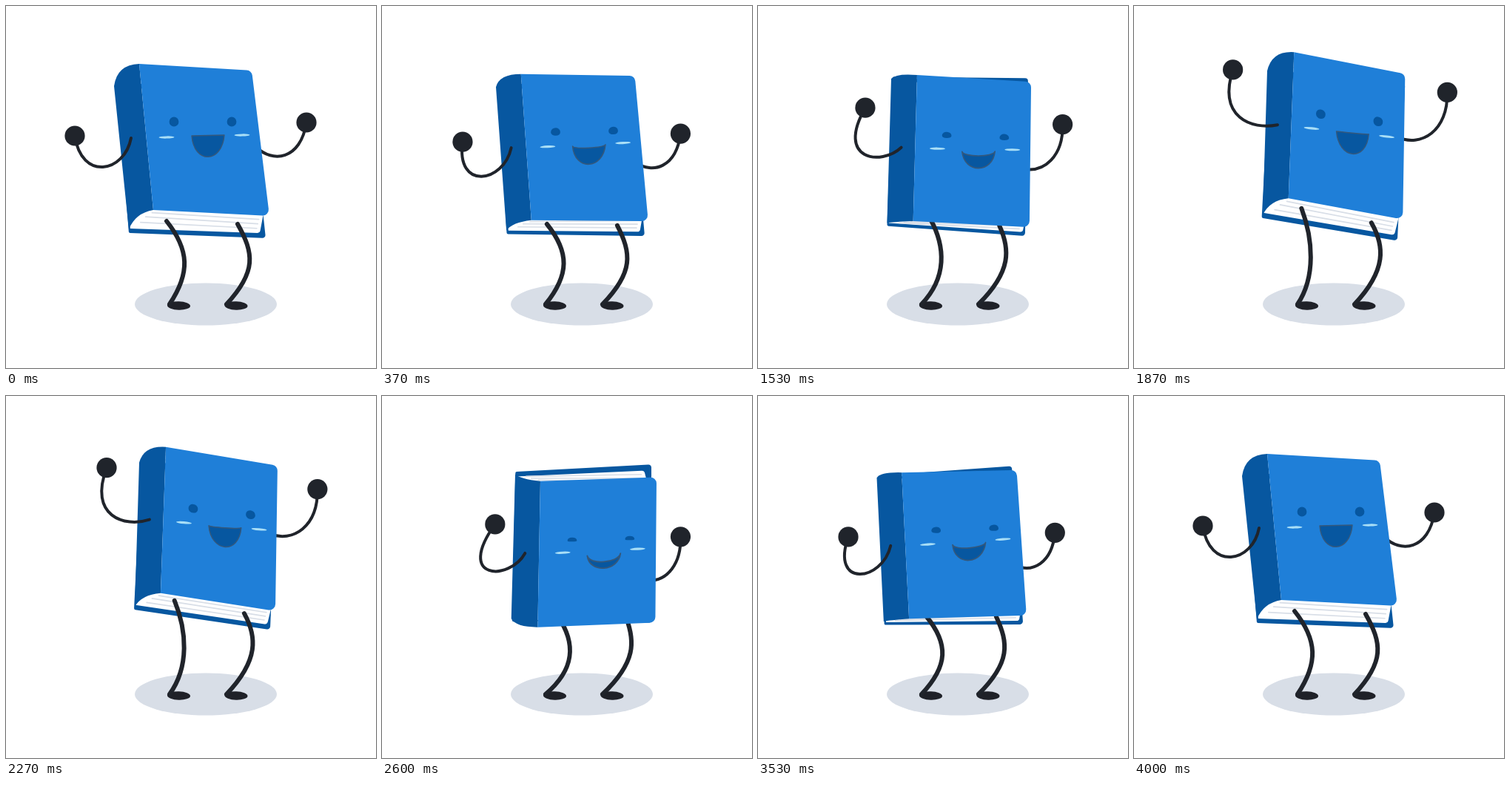
An HTML page with a canvas that plays this animation: 500x488 px, repeating every 4.03 s.

```html
<!DOCTYPE html>
<html lang="en">
<head>
<meta charset="utf-8">
<title>Dancing book</title>
<style>
  html, body { margin: 0; width: 100%; height: 100%; overflow: hidden; background: #fff; }
  canvas { display: block; }
</style>
</head>
<body>
<canvas id="stage" width="500" height="488"></canvas>
<script>
const ctx = document.getElementById('stage').getContext('2d');
const BLUE = '#1f7fd8', NAVY = '#0757a0', INK = '#20242b', GREY = '#d8dee7';

// Every point is given in three poses: leaning left, crouching, stretching up.
const book = {
  frontTL: [180, 78, 213, 137, 216.4, 60.4],
  frontTR: [332, 87, 373, 117, 366.2, 91],
  frontBR: [356, 283, 372, 313, 363, 287],
  frontBL: [199, 275, 211, 334, 208.7, 257.4],
  spineT: [146, 108, 180, 113, 180, 87],
  bendT: [150, 79, 187, 134, 186, 58.5],
  spineB: [166, 301, 175, 308, 174, 281],
  bendB: [175, 279, 180, 333, 183.4, 260],
  backTL: [150, 106, 179, 109, 183.5, 85.4],
  backTR: [328, 100, 363, 87, 366.4, 105],
  backBR: [351, 313, 368, 301, 355.6, 316.8],
  backBL: [166, 306, 177, 312, 172.5, 285],
  pageTL: [151, 111, 181, 115, 184.4, 92.5],
  pageTR: [325, 112, 354, 95, 355, 114],
  foreT: [330, 125, 360, 119, 358, 126],
  foreB: [347.5, 282, 366, 290, 357, 287],
  pageBR: [343, 306, 366, 299, 351.4, 309],
  pageBL: [168, 300, 180, 312, 174.4, 278]
};
const legs = [
  [[217, 290, 242, 307, 226, 272], [248, 329, 271, 341, 241, 313],
   [249, 360, 268, 369, 245.5, 364.5], [221, 402, 221, 402, 221, 402]],
  [[313, 294, 334, 302, 320.5, 292], [335, 333, 343, 333, 338.5, 323],
   [339, 358, 345, 360, 341.6, 355.5], [298, 402, 298, 402, 298, 402]]
];
const leftArm = [[169, 178, 193, 234, 194, 158.5], [160, 225, 178, 285, 158, 164.5],
  [102, 236, 92, 290, 113.5, 147], [93, 175, 161, 210, 133, 83]];
const rightArm = [[338, 190, 360, 280, 354.5, 174], [360, 212, 385, 275, 388.5, 189.5],
  [398, 208, 396, 250, 425, 166.5], [406, 157, 395, 221, 424, 114]];
const eyes = [[227, 156, 259, 216, 252.2, 144.2], [305, 156, 337, 209, 329.7, 154.5]];
const cheeks = [[217, 177, 246, 231, 239.8, 163.4], [319, 174, 347, 219, 341.4, 175]];
const lips = [[251, 175, 279, 235, 273.4, 167.5], [295, 174, 324.5, 229, 317, 171.5]];

const mix = (a, b, k) => a + (b - a) * k;
const between = (a, b, k) => [mix(a[0], b[0], k), mix(a[1], b[1], k)];

// Cubic bezier easing (.55, 0, .45, 1)
function ease(x) {
  let lo = 0, hi = 1;
  for (let i = 0; i < 25; i++) {
    const s = (lo + hi) / 2, r = 1 - s;
    if (1.65 * s * r * r + 1.35 * s * s * r + s * s * s < x) lo = s; else hi = s;
  }
  return lo * lo * (3 - 2 * lo);
}

// Closed polygon of [point, corner radius] pairs
function poly(color, corners) {
  const first = corners[0][0], last = corners[corners.length - 1][0];
  ctx.beginPath();
  ctx.moveTo(...between(last, first, .5));
  corners.forEach(([p, r], i) => {
    const next = corners[(i + 1) % corners.length][0];
    ctx.arcTo(...p, ...next, r);
  });
  ctx.closePath();
  ctx.fillStyle = color;
  ctx.fill();
}

function oval(color, [x, y], rx, ry, turn = 0) {
  ctx.beginPath();
  ctx.ellipse(x, y, rx, ry, turn, 0, 7);
  ctx.fillStyle = color;
  ctx.fill();
}

function limb([a, b, c, d], width) {
  ctx.beginPath();
  ctx.moveTo(...a);
  ctx.bezierCurveTo(...b, ...c, ...d);
  ctx.strokeStyle = INK;
  ctx.lineWidth = width;
  ctx.stroke();
}

// Shape between two bows hung from a to b; sags are measured downwards.
function bows(a, b, upper, lower, inset, line, width) {
  const u = upper * 4 / 3, l = lower * 4 / 3;
  ctx.beginPath();
  ctx.moveTo(...a);
  ctx.bezierCurveTo(a[0] + inset, a[1] + u, b[0] - inset, b[1] + u, ...b);
  ctx.bezierCurveTo(b[0] - inset, b[1] + l, a[0] + inset, a[1] + l, ...a);
  ctx.closePath();
  ctx.fillStyle = NAVY;
  ctx.fill();
  ctx.strokeStyle = line;
  ctx.lineWidth = width;
  ctx.stroke();
}

// Lines along the visible paper edge
function sheets(start, bend, end, outer, inner) {
  ctx.strokeStyle = GREY;
  ctx.lineWidth = 1.7;
  for (let k = .25; k < 1; k += .25) {
    const [x, y] = between(between(start, bend, k), between(bend, end, k), k);
    const right = between(outer, inner, k);
    const from = between([x, y], right, .06);
    ctx.beginPath();
    ctx.moveTo(...from);
    ctx.lineTo(...between([x, y], right, .97));
    ctx.stroke();
  }
}

function draw(time) {
  const step = Math.min(120, Math.floor((time % 4030 + 4) * .03));
  const s = Math.min(step, 120 - step) / 30;
  const rising = s > 1, e = ease(rising ? s - 1 : s);
  const crouch = rising ? 1 - e : e;
  const at = p => rising
    ? between([p[2], p[3]], [p[4], p[5]], e)
    : between([p[0], p[1]], [p[2], p[3]], e);
  const b = {};
  for (const name in book) b[name] = at(book[name]);

  ctx.fillStyle = '#fff';
  ctx.fillRect(0, 0, 500, 488);
  ctx.lineCap = ctx.lineJoin = 'round';
  oval(GREY, [270, 402], 96, 28.5);

  poly(NAVY, [[b.backTL, 2], [b.backTR, 4], [b.backBR, 4], [b.backBL, 2]]);
  poly('#fff', [[b.pageTL, 0], [b.pageTR, 4], [b.foreT, 0],
    [b.foreB, 0], [b.pageBR, 4], [b.pageBL, 0]]);
  sheets(b.spineT, b.bendT, b.frontTL, b.pageTR, b.foreT);
  sheets(b.spineB, b.bendB, b.frontBL, b.pageBR, b.foreB);

  oval('#1f2128', [233.5, 404], 15.5, 5.7, .03);
  oval('#1f2128', [311, 404], 15.5, 5.7, .03);
  legs.forEach(leg => limb(leg.map(at), 6));
  const right = rightArm.map(at), left = leftArm.map(at);
  limb(right, 4);
  oval(INK, right[3], 13.6, 13.6);

  ctx.beginPath();
  ctx.moveTo(...b.frontTL);
  ctx.quadraticCurveTo(...b.bendT, ...b.spineT);
  ctx.lineTo(...b.spineB);
  ctx.quadraticCurveTo(...b.bendB, ...b.frontBL);
  ctx.closePath();
  ctx.fillStyle = NAVY;
  ctx.fill();
  poly(BLUE, [[b.frontTL, 0], [b.frontTR, 8], [b.frontBR, 8], [b.frontBL, 0]]);

  limb(left, 4);
  oval(INK, left[3], 13.6, 13.6);

  const [eyeL, eyeR] = eyes.map(at);
  const tilt = (eyeR[1] - eyeL[1]) / (eyeR[0] - eyeL[0]);
  for (const [x, y] of [eyeL, eyeR]) {
    bows([x - 5.4, y - 5.4 * tilt], [x + 5.4, y + 5.4 * tilt],
      mix(-5.4, -2.5, crouch), mix(5.4, -2, crouch), 0, NAVY, 2);
  }
  const [cheekL, cheekR] = cheeks.map(at);
  const turn = Math.atan2(cheekR[1] - cheekL[1], cheekR[0] - cheekL[0]);
  for (const cheek of [cheekL, cheekR]) oval('#a9dff7', cheek, 10.5, 1.6, turn);

  bows(...lips.map(at), mix(0, 13.7, crouch), mix(28.8, 14, crouch), 3,
    '#34587c', mix(1.4, 2, crouch));
}

const start = performance.now();
function tick() {
  draw(performance.now() - start);
  requestAnimationFrame(tick);
}
tick();
</script>
</body>
</html>
```
